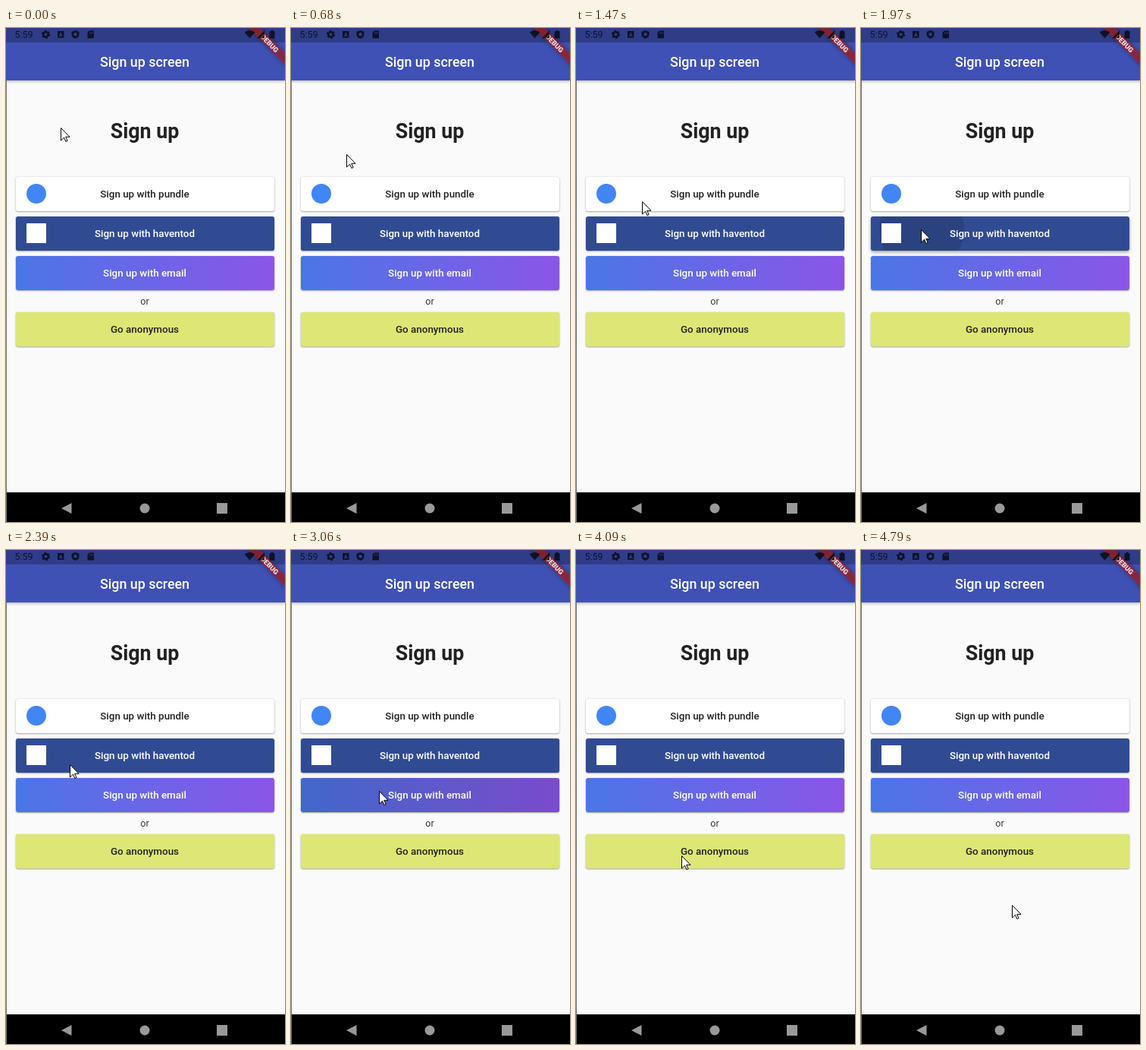
An HTML page that plays this animation: 368x650 px, repeating every 5630 ms.

```html
<!DOCTYPE html>
<html lang="en">
<head>
<meta charset="utf-8">
<title>Sign up screen</title>
<style>
html, body { margin: 0; width: 100%; height: 100%; overflow: hidden; }
body { background: #fafafa; font-family: Roboto, sans-serif; color: #212121; }
#stage { position: absolute; left: 0; top: 0; width: 368px; height: 650px; overflow: hidden; }
#stage > * { position: absolute; }
.bar { left: 0; top: 0; width: 368px; height: 69px; background: #3f51b5; box-shadow: 0 2px 3px rgba(0,0,0,.22); }
.status { left: 0; top: 0; width: 368px; height: 19px; background: #2f3d88; }
.nav { left: 0; top: 611px; width: 368px; height: 39px; background: #000; }
.edge { left: 0; top: 69px; width: 1px; height: 581px; background: #707070; }
.line { left: 0; width: 366px; text-align: center; white-space: nowrap; }
.title { top: 34px; font: 500 17.86px/22px Roboto, sans-serif; color: #fff; }
.head { top: 119px; font: 700 26.8px/34px Roboto, sans-serif; }
.or { top: 351px; font: 400 12.5px/17px Roboto, sans-serif; color: #333; }
.btn {
  left: 13px; width: 341px; height: 45px; border-radius: 3px; overflow: hidden;
  box-shadow: 0 0 2px rgba(0,0,0,.16), 0 1px 2px rgba(0,0,0,.3);
  font: 500 13.4px/45px Roboto, sans-serif; text-align: center; color: #fff;
}
.btn.lift { box-shadow: 0 0 2px rgba(0,0,0,.16), 0 2px 4px rgba(0,0,0,.34); }
.btn.dark { color: #212121; }
.btn span { position: relative; left: -.5px; }
.btn i { position: absolute; border-radius: 50%; background: #000; opacity: 0; }
.btn b { position: absolute; left: 14px; top: 9px; width: 26px; height: 26px; }
svg { left: 0; top: 0; }
</style>
</head>
<body>
<div id="stage">
  <div class="bar"></div>
  <div class="status"></div>
  <div class="line title">Sign up screen</div>
  <div class="line head">Sign up</div>
  <div class="btn dark" style="top:196px;background:#fff"><i></i><b style="background:#4285f4;border-radius:50%"></b><span>Sign up with pundle</span></div>
  <div class="btn" style="top:248px;background:#314b92"><i></i><b style="background:#fff"></b><span>Sign up with haventod</span></div>
  <div class="btn" style="top:300px;background:linear-gradient(90deg,#4a76e6,#8b55e8)"><i></i><span>Sign up with email</span></div>
  <div class="line or">or</div>
  <div class="btn dark" style="top:374px;background:#dce775"><i></i><span>Go anonymous</span></div>
  <div class="nav"></div>
  <div class="edge"></div>
  <svg width="368" height="650" viewBox="0 0 368 650">
    <g transform="translate(368 0) rotate(45)">
      <rect x="-60" y="23.3" width="120" height="10.7" fill="#b71c1c" fill-opacity=".63" style="filter:drop-shadow(0 0 3px rgba(0,0,0,.5))"/>
      <text y="31.9" text-anchor="middle" font-family="Roboto, sans-serif" font-size="9.1" font-weight="900" fill="#fff" fill-opacity=".88">DEBUG</text>
    </g>
    <g fill="#000" fill-opacity=".7">
      <text x="11.5" y="13.3" font-family="Roboto, sans-serif" font-size="12.5">5:59</text>
      <g fill="none" stroke="#000" stroke-opacity=".7">
        <circle cx="52.5" cy="8.5" r="3.2" stroke-width="2.6"/>
        <circle cx="52.5" cy="8.5" r="5" stroke-width="1.4" stroke-dasharray="2.6 2.636"/>
      </g>
      <path fill-rule="evenodd" d="M68 4h8.5v9H68zM72.2 5.5L69.7 11.5h1.2l.5-1.3h1.7l.5 1.3h1.2z"/>
      <path fill-rule="evenodd" d="M91.5 3l5 2v3.5q0 4-5 5.5q-5-1.5-5-5.5V5zM91.5 6a2.3 2.3 0 1 0 .01 0z"/>
      <path fill-rule="evenodd" d="M110 3.5h6v10h-8.5V6zM110 5.5v2h1v-2zM112 5.5v2h1v-2zM114 5.5v2h1v-2z"/>
      <path d="M314.5 5.5q7-5 14 0L321.5 13.5z"/>
      <path d="M341 3v10.5h-10z"/>
      <path d="M347.5 4.2h2V3h3v1.2h2v9.5h-7z"/>
    </g>
    <g fill="#999">
      <path d="M73 632l13.5-7v14z"/>
      <circle cx="183" cy="632" r="6.5"/>
      <rect x="278" y="625" width="14" height="14"/>
    </g>
    <path id="cursor" d="M.5.5v16.5l4-3.8 2.4 5.3 2.2-1-2.4-5.2h5.3z" fill="#fff" stroke="#000"/>
  </svg>
</div>
<script>
const LOOP = 5630;
const HOP = 140;   // rough time between cursor hops
const BEAT = 120;  // time between ripple steps

const home = { x: 72, y: 131 };

// bend 1 is a straight line; 2 goes down first, then right
const glides = [
  { start: 405, end: 980, x: 91, y: 210, bend: 2 },
  { start: 1345, end: 1720, x: 79, y: 265, bend: 1 },
  { start: 2250, end: 2390, x: 84, y: 282, bend: 1 },
  { start: 2390, end: 2660, x: 116, y: 317, bend: 1 },
  { start: 3150, end: 3600, x: 139, y: 402, bend: 2 },
  { start: 4490, end: 4790, x: 199, y: 467, bend: 1 }
];

// one press per button, from top to bottom
const presses = [
  { start: 980, end: 1470 },
  { start: 1970, end: 2390 },
  { start: 2800, end: 3300 },
  { start: 3720, end: 4090 }
];

const cursor = document.getElementById('cursor');
const buttons = [...document.querySelectorAll('.btn')].map(el => ({
  el, ink: el.querySelector('i'), top: el.offsetTop, left: el.offsetLeft,
  midX: el.offsetWidth / 2, midY: el.offsetHeight / 2
}));

const mix = (a, b, p) => a + (b - a) * p;

function pointAt(t) {
  let { x, y } = home;
  for (const g of glides) {
    if (t < g.start) break;
    const span = g.end - g.start;
    const hops = Math.round(span / HOP);
    const p = Math.min(hops, Math.floor((t - g.start) * hops / span)) / hops;
    x = mix(x, g.x, p ** g.bend);
    y = mix(y, g.y, 1 - (1 - p) ** g.bend);
  }
  return { x: Math.round(x), y: Math.round(y) };
}

function drawPress({ el, ink, top, left, midX, midY }, press, t) {
  const on = t >= press.start && t < press.end;
  const age = Math.floor((t - press.start) / BEAT) * BEAT;
  const spread = Math.min(1, ((age + 95) / 335) ** 3);
  const fading = age > 2 * BEAT;
  el.classList.toggle('lift', on && spread < 1);
  ink.style.opacity = on ? (fading ? .06 : .12) : 0;
  if (!on) return;
  const from = pointAt(press.start);
  const r = mix(53, midX + 6, spread);
  ink.style.left = mix(from.x - left - 1.5, midX, spread) - r + 'px';
  ink.style.top = mix(from.y - top, midY, spread) - r + 'px';
  ink.style.width = ink.style.height = 2 * r + 'px';
}

function draw(t) {
  const { x, y } = pointAt(t);
  cursor.setAttribute('transform', `translate(${x} ${y})`);
  buttons.forEach((button, n) => drawPress(button, presses[n], t));
}

let begin;
function tick(now) {
  begin ??= now;
  draw((now - begin) % LOOP);
  requestAnimationFrame(tick);
}
draw(0);
requestAnimationFrame(tick);
</script>
</body>
</html>
```
